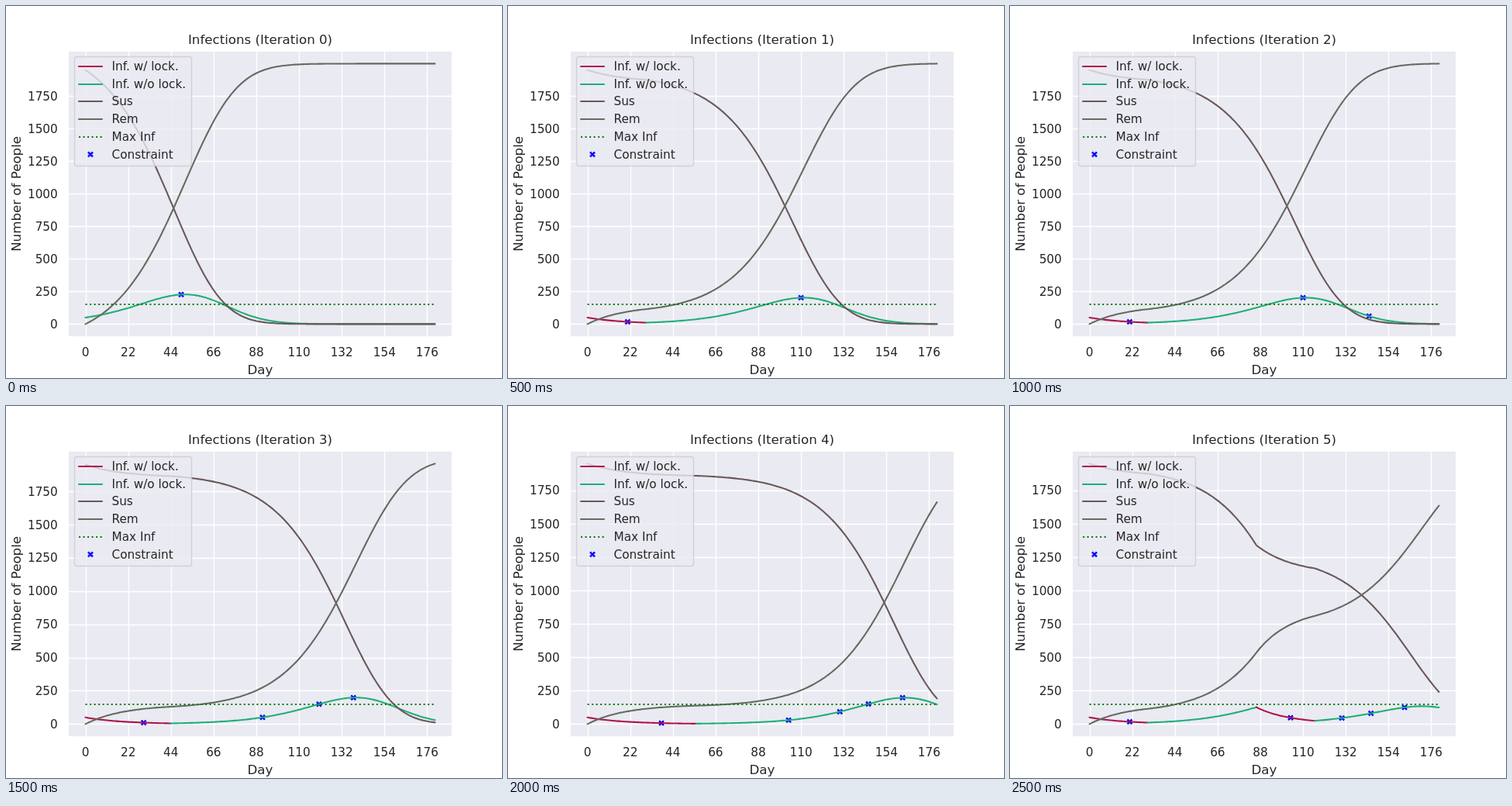
These frames come from a looping animation (640x480 px, 3 s). An HTML page:

```html
<!DOCTYPE html>
<html lang="en">
<head>
<meta charset="utf-8">
<title>Infections</title>
<style>
  html, body { margin: 0; width: 640px; height: 480px; overflow: hidden; background: #fff; }
  svg { display: block; }
  text { font: 15.28px "DejaVu Sans", sans-serif; fill: #262626; }
  .big { font-size: 16.67px; }
  .mid { text-anchor: middle; }
  .end { text-anchor: end; }
  .grid { stroke: #fff; stroke-width: 1.39; }
  .line { fill: none; stroke-width: 2.08; stroke-linecap: round; stroke-linejoin: round; }
  .dots { stroke: #008000; stroke-width: 2.08; stroke-dasharray: 2.08 3.44; }
  .mark { fill: #00f; stroke: #fff; stroke-width: .67; }
</style>
</head>
<body>
<svg id="chart" width="640" height="480" viewBox="0 0 640 480"></svg>
<script>
const STEP = 500;
const DAYS = 180;
const GAMMA = 0.15;   // removal rate
const GROWTH = 0.05;  // rate of the infected/susceptible ratio, negated in lockdown
const LEFT = 102.545, RIGHT = 553.455, BASE = 410.4, HEIGHT = 336;
const COLOR = { lock: '#b0124a', open: '#1fae78', sus: '#6a5858', rem: '#636b60' };

const runs = [
  { locks: [], marks: [49.3] },
  { locks: [[0, 30]], marks: [20.7, 110] },
  { locks: [[0, 30]], marks: [20.7, 110, 144] },
  { locks: [[0, 44]], marks: [30, 91.2, 120.3, 138] },
  { locks: [[0, 56]], marks: [38.1, 103.6, 130, 144.7, 162.3] },
  { locks: [[0, 30], [86, 116]], marks: [20.7, 103.6, 130, 145, 162.3] }
];

const chart = document.getElementById('chart');
const px = day => LEFT + (RIGHT - LEFT) * day / DAYS;
const snap = v => Math.floor(v + 0.5) + 0.5;

const text = (x, y, str, cls = '', extra = '') =>
  `<text x="${x}" y="${y}" class="${cls}" ${extra}>${str}</text>`;
const seg = (x1, y1, x2, y2, cls, color = '') =>
  `<line x1="${x1}" y1="${y1}" x2="${x2}" y2="${y2}" class="${cls}"${color && ` stroke="${color}"`}/>`;
const cross = (x, y) =>
  `<path class="mark" transform="translate(${x} ${y}) scale(1)" d="M-2.08-4.17L0-2.08 2.08-4.17 4.17-2.08 2.08 0 4.17 2.08 2.08 4.17 0 2.08-2.08 4.17-4.17 2.08-2.08 0-4.17-2.08Z"/>`;

// Exact daily solution of S' = -bSI/(S+I), I' = bSI/(S+I) - gI
function simulate(locks) {
  let alive = 2000, ratio = 50 / 1950;
  const out = [];
  for (let day = 0; day <= DAYS; day++) {
    const sus = alive / (1 + ratio);
    const locked = locks.some(([a, b]) => day >= a && day < b);
    out.push({ sus, inf: alive - sus, rem: 2000 - alive, locked });
    const rate = locked ? -GROWTH : GROWTH;
    const next = ratio * Math.exp(rate);
    alive *= ((1 + next) / (1 + ratio)) ** (-GAMMA / rate);
    ratio = next;
  }
  return out;
}

function legend() {
  const rows = [['Inf. w/ lock.', 'lock'], ['Inf. w/o lock.', 'open'], ['Sus', 'sus'],
                ['Rem', 'rem'], ['Max Inf'], ['Constraint']];
  let out = '<rect x="88.5" y="65.5" width="151" height="141" rx="3" fill="#eaeaf2" stroke="#ccc" stroke-width="1.39" opacity=".8"/>';
  rows.forEach(([label, key], i) => {
    const y = Math.round(78 + 22.7 * i);
    if (key) out += seg(94, y, 124, y, 'line', COLOR[key]);
    else out += i === 4 ? seg(94, y, 124.5, y, 'dots') : cross(109, 191.5);
    out += text(136.5, y + 5, label);
  });
  return out;
}

function draw(index) {
  const { locks, marks } = runs[index];
  const data = simulate(locks);
  const scale = HEIGHT / Math.max(data[0].sus, data[DAYS].rem);
  const py = v => BASE - v * scale;
  const curve = (key, from, to, color) => {
    const pts = data.slice(from, to + 1)
      .map((d, i) => `${px(from + i).toFixed(2)},${py(d[key]).toFixed(2)}`);
    return `<polyline class="line" stroke="${color}" points="${pts.join(' ')}"/>`;
  };
  const infAt = day => {
    const i = Math.floor(day), a = data[i].inf;
    return a + (data[i + 1].inf - a) * (day - i);
  };

  let out = '<rect x="80" y="58" width="496" height="369" fill="#eaeaf2"/>';
  for (let day = 0; day <= 176; day += 22) {
    const x = px(day);
    out += seg(snap(x), 58, snap(x), 427, 'grid') + text(x, 452, day, 'mid');
  }
  for (let v = 0; v <= 1750; v += 250) {
    const y = py(v);
    out += seg(80, snap(y), 576, snap(y), 'grid') + text(66.8, Math.round(y + 5.6), v, 'end');
  }
  marks.forEach(day => { out += cross(px(day), py(infAt(day))); });

  let from = 0;
  for (let day = 1; day <= DAYS; day++) {
    const { locked } = data[from];
    if (day === DAYS || data[day].locked !== locked) {
      out += curve('inf', from, day, locked ? COLOR.lock : COLOR.open);
      from = day;
    }
  }
  out += curve('sus', 0, DAYS, COLOR.sus) + curve('rem', 0, DAYS, COLOR.rem);
  const cap = Math.round(py(150));
  out += seg(LEFT, cap, RIGHT, cap, 'dots');
  out += '<rect x="80" y="58" width="496" height="369" fill="none" stroke="#fff" stroke-width="1.74"/>';
  out += legend();
  out += text(328, 49, `Infections (Iteration ${index})`, 'big mid');
  out += text(328, 475, 'Day', 'big mid');
  out += text(0, 0, 'Number of People', 'big mid', 'transform="translate(18.5 242.4) rotate(-90)"');
  chart.innerHTML = out;
}

let shown = -1;
const start = performance.now();
function tick() {
  const index = Math.floor((performance.now() - start) / STEP) % runs.length;
  if (index !== shown) draw(shown = index);
  requestAnimationFrame(tick);
}
tick();
</script>
</body>
</html>
```
